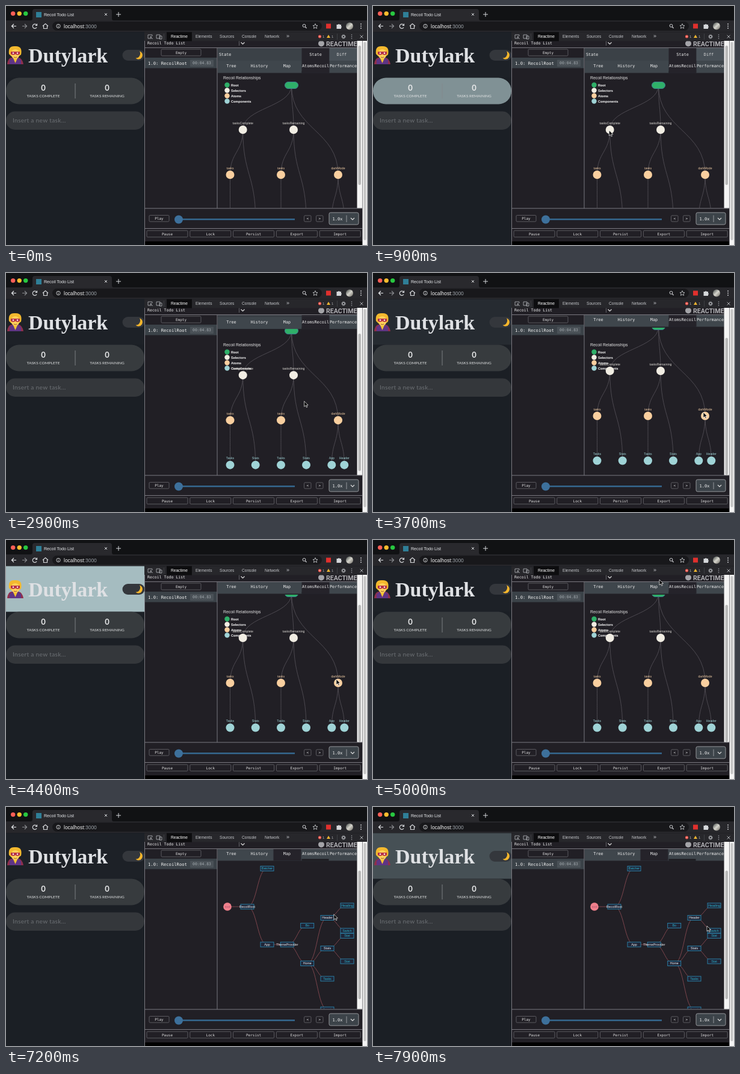
Animation of 600 by 398 pixels, one loop 8 s. Source, as an HTML page:

```html
<!DOCTYPE html>
<html lang="en">
<head>
<meta charset="utf-8">
<title>Recoil Todo List</title>
<style>
html, body { margin: 0; width: 100%; height: 100%; overflow: hidden; background: #111214; }
svg { display: block; width: 600px; height: 398px; font-family: "Liberation Sans", Arial, sans-serif; }
.mono { font-family: "DejaVu Sans Mono", monospace; }
.lato { font-family: Lato, sans-serif; }
.serif { font-family: "Liberation Serif", serif; font-weight: 700; }
.bold { font-weight: 700; }
.logo { font-family: Roboto, sans-serif; font-weight: 700; }
</style>
</head>
<body>
<svg id="stage" viewBox="0 0 600 398"></svg>
<script>
const stage = document.getElementById('stage');
const rect = (x, y, w, h, fill, more = '') =>
  `<rect x="${x}" y="${y}" width="${w}" height="${h}" fill="${fill}" ${more}/>`;
const disc = (x, y, r, fill, more = '') =>
  `<circle cx="${x}" cy="${y}" r="${r}" fill="${fill}" ${more}/>`;
const line = (d, color, w = 1) =>
  `<path d="${d}" fill="none" stroke="${color}" stroke-width="${w}"/>`;
const text = (x, y, s, size, fill, cls = '', anchor = 'start') =>
  `<text x="${x}" y="${y}" font-size="${size}" fill="${fill}" class="${cls}" text-anchor="${anchor}">${s}</text>`;
const mid = (x, y, s, size, fill, cls) => text(x, y, s, size, fill, cls, 'middle');
const button = (x, y, w, h, s) =>
  rect(x, y, w, h, '#211f25', 'rx="1.5" stroke="#6b6a70" stroke-width=".8"') +
  mid(x + w / 2, y + h / 2 + 2.2, s, 6, '#e4e4e4', 'mono');

function browser() {
  const ink = '#d5d7da';
  return rect(0, 0, 600, 24, '#111214') +
    ['#ff5f57', '#febc2e', '#28c840'].map((c, i) => disc(11.7 + 10.5 * i, 12.6, 3.7, c)).join('') +
    '<path d="M41 24Q44 24 44 21V9Q44 5 48 5H172Q176 5 176 9V21Q176 24 179 24Z" fill="#29292d"/>' +
    rect(50, 10, 9, 9, '#2f7f97') +
    text(63, 16.5, 'Recoil Todo List', 7.1, '#e8eaed') +
    line('M164 12L168 16M168 12L164 16M187 10V18M183 14H191', ink) +
    rect(0, 24, 600, 19.5, '#27272b') +
    rect(77, 26, 448, 15, '#18181b', 'rx="7.5"') +
    line('M17 33.5H9.5M13 30L9.5 33.5L13 37', '#e8eaed', 1.2) +
    line('M27 33.5H34.5M31 30L34.5 33.5L31 37', '#8b8d91', 1.2) +
    line('M51 32A3.6 3.6 0 1 0 51 35.5M51.5 29.5V32.5H48.5', ink, 1.2) +
    line('M61 33.5L65.5 29.5L70 33.5M62.5 33V37.5H68.5V33', ink, 1.2) +
    disc(87, 33.5, 3.2, 'none', `stroke="${ink}" stroke-width=".9"`) + line('M87 33V35.5M87 31.3V32.2', ink, .9) +
    '<text x="96" y="36.5" font-size="8.5" fill="#f1f1f1">localhost<tspan fill="#9aa0a6">:3000</tspan></text>' +
    disc(495.5, 32.8, 2.4, 'none', `stroke="${ink}"`) + line('M497.3 34.6L499.5 37', ink, 1.2) +
    '<path d="M514 29.5L515.2 32.3L518 32.5L515.9 34.5L516.6 37.4L514 35.8L511.4 37.4L512.1 34.5L510 32.5L512.8 32.3Z" fill="none" stroke="#d5d7da" stroke-width=".8"/>' +
    rect(532, 29.5, 8, 8, '#e0302d') +
    '<path d="M549.5 31H552A1.3 1.3 0 0 1 554.5 31H557V33.5A1.3 1.3 0 0 1 557 36V38H549.5Z" fill="#d5d7da"/>' +
    disc(571, 33.5, 6, 'url(#photo)') +
    [30, 33.5, 37].map(y => disc(590, y, .9, ink)).join('');
}

function page() {
  return rect(0, 43.5, 230, 355, '#1b1f25') +
    '<rect id="header" y="43.5" width="230" height="76"/>' +
    // caped figure
    '<path d="M2 97Q3 87 9 86H21Q27 87 29 97Z" fill="#8f2f4c"/>' +
    '<path d="M6 97V90L11 86H20L25 90V97Z" fill="#5f3585"/>' +
    '<path d="M12 87H19L15.5 95Z" fill="#f5c531"/>' +
    '<path d="M5 80Q3 66 15 67Q28 66 25 81L21 84H9Z" fill="#f4b92e"/>' +
    '<ellipse cx="15.5" cy="80" rx="7" ry="8" fill="#ffd05a"/>' +
    '<path d="M8 76H23V80Q19 83 15.5 80Q12 83 8 80Z" fill="#b52f45"/>' +
    disc(12, 78.5, 1.2, '#fff') + disc(19, 78.5, 1.2, '#fff') +
    line('M13 85Q15.5 87 18 85', '#8d4a25', .9) +
    text(37, 93.5, 'Dutylark', 34, '#dfe1e4', 'serif') +
    rect(193.5, 73, 37, 18, '#34373c', 'rx="9"') +
    '<path d="M222 75.3A6.8 6.8 0 1 1 215.5 86.8A7.6 7.6 0 0 0 222 75.3Z" fill="#f6b72c"/>' +
    '<rect id="stats" y="119.5" width="230" height="44" rx="21.5"/>' +
    line('M115 129V154', '#85898c', .9) +
    mid(62, 140.7, '0', 13, '#e9eaeb', 'lato bold') + mid(168, 140.7, '0', 13, '#e9eaeb', 'lato bold') +
    mid(62, 152.2, 'TASKS COMPLETE', 6.5, '#e2e4e5', 'lato') +
    mid(168, 152.2, 'TASKS REMAINING', 6.5, '#e2e4e5', 'lato') +
    rect(0, 175.5, 230, 30.5, '#34373b', 'rx="15"') +
    '<text x="11" y="194" font-size="10.2" letter-spacing=".3" fill="#6c7074" class="lato">Insert a new task...</text>';
}

function tools() {
  const tabs = [[274, 'Reactime'], [315, 'Elements'], [355, 'Sources'], [392, 'Console'], [430, 'Network'], [466, '»']];
  const ink = '#a9abaf';
  const panel = rect(230, 43.5, 370, 355, '#211f25') +
    text(235, 64, 'Recoil Todo List', 6.55, '#ededed', 'mono') +
    line('M387.5 58V66', '#77777c', .8) + line('M390.5 60.5L393.5 63.5L396.5 60.5', '#ddd', 1.2) +
    disc(524, 62.5, 5, '#a4a4a8') + text(532, 67, 'REACTIME', 10.6, '#b0b0b4', 'logo') +
    button(258, 72, 66, 11, 'Empty') +
    rect(231, 86, 120, 17.5, '#3b4248') +
    text(236, 97.5, '1.0: RecoilRoot', 7.2, '#f0f0f0', 'mono') +
    rect(306, 89.5, 39, 11.5, '#4a5157', 'rx="1"') + mid(325.5, 97.3, '00:04.83', 6.4, '#a5abb0', 'mono');
  // the bar cuts off the top of the scrolled panel
  return panel + rect(230, 43.5, 370, 15, '#27272b') + rect(267, 43.5, 42, 15, '#0d0d0f') +
    line('M242 54H236V48H243V50M240 51L244 55M240 53.5V51H242.5M250 48H256V54H250ZM255 50H259V55H255Z', ink, .9) +
    line('M262.5 46V56', '#4a4c50', .7) +
    tabs.map(([x, s], i) => text(x, 53, s, i < 5 ? 6.6 : 9, i ? '#c4c6ca' : '#fff')).join('') +
    disc(521.5, 50.8, 2.6, '#ee5147') + line('M520.5 49.8L522.5 51.8M522.5 49.8L520.5 51.8', '#fff', .6) +
    text(526, 53, '1', 6, ink) +
    '<path d="M536 47.8L539 53H533Z" fill="#f2b632"/>' + text(541, 53, '1', 6, ink) +
    line('M550.5 46V56', '#4a4c50', .7) +
    disc(561, 51, 2.5, 'none', `stroke="${ink}" stroke-width="2" stroke-dasharray="1.3 .65"`) +
    disc(561, 51, 1.9, 'none', `stroke="${ink}" stroke-width=".9"`) +
    [48, 51, 54].map(y => disc(574.5, y, .8, ink)).join('') +
    line('M588.5 48.5L593.5 53.5M593.5 48.5L588.5 53.5', ink);
}

function tabRows() {
  const names = ['Tree', 'History', 'Map', 'AtomsRecoil', 'Performance'];
  return rect(352, 70, 231.5, 21, '#3b4147') + rect(491.5, 70, 46, 21, '#25232a') + rect(537.5, 70, 46, 21, '#495158') +
    text(354, 83, 'State', 6.8, '#eee', 'mono') + mid(514.5, 83, 'State', 6.8, '#eee', 'mono') +
    mid(558, 83, 'Diff', 6.8, '#ddd', 'mono') +
    rect(352, 91, 231.5, 20.5, '#3f464c') + rect(491.5, 108.5, 45, 3, '#1d1c21') +
    '<rect id="active" y="91" width="46" height="20.5" fill="#25232a"/>' +
    names.map((s, i) => mid([374.5, 421, 467, 514.5, 560.5][i], 102, s, 6.8, '#eee', 'mono')).join('');
}

const shades = ['#2fb069', '#f1ede3', '#f9cf9f', '#9fd3d6'];

function legend() {
  return text(361, 122, 'Recoil Relationships', 6.9, '#e6e6e6') +
    ['Root', 'Selectors', 'Atoms', 'Components'].map((s, i) =>
      disc(367.5, 131.5 + 9 * i, 4.2, shades[i]) + text(374, 133.5 + 9 * i, s, 5.5, '#fff', 'bold')).join('');
}

function graph() {
  // name, x, level, y, parent
  const nodes = [['', 474.5, 0, 132],
    ['tasksComplete', 393.7, 1, 206, 0], ['tasksRemaining', 478, 1, 206, 0],
    ['tasks', 372.5, 2, 281, 1], ['tasks', 457, 2, 281, 2], ['darkMode', 552, 2, 281, 0],
    ['Tasks', 372.5, 3, 355.5, 3], ['Stats', 414.7, 3, 355.5, 1],
    ['Tasks', 457, 3, 355.5, 4], ['Stats', 499, 3, 355.5, 2],
    ['App', 541.3, 3, 355.5, 5], ['Header', 562.3, 3, 355.5, 5]];
  const links = nodes.slice(1).map(([, x, , y, p]) => {
    const [, px, , py] = nodes[p], m = (y + py) / 2;
    return line(`M${px} ${py}C${px} ${m} ${x} ${m} ${x} ${y}`, '#57545b', .8);
  });
  const marks = nodes.map(([s, x, k, y]) => k
    ? disc(x, y, 7, shades[k]) + mid(x, y - 9.3, s, 5.2, ['', '#dad7d2', '#e9c6a0', '#9fd3d6'][k])
    : rect(x - 11, y - 5.5, 22, 11, shades[0], 'rx="5.5" stroke="#3d8290"'));
  return links.join('') + marks.join('');
}

function tree() {
  // name, x, y, parent
  const nodes = [['root', 368, 166], ['RecoilRoot', 401, 166, 0], ['Batcher', 434, 102.5, 1], ['App', 434, 229, 1],
    ['ThemeProvider', 467.3, 229, 3], ['Bo', 500.7, 197.5, 4], ['Home', 500.7, 260.5, 4],
    ['Header', 534, 184.5, 6], ['Stats', 534, 235.5, 6], ['Tasks', 534, 286, 6], ['Input', 534, 337, 6],
    ['Heading', 567, 164, 7], ['Switch', 567, 206, 7], ['Stat', 567, 214.5, 8], ['Stat', 567, 257, 8]];
  const links = nodes.slice(1).map(([, x, y, p]) => {
    const [, px, py] = nodes[p], m = (x + px) / 2;
    return line(`M${px} ${py}C${m} ${py} ${m} ${y} ${x} ${y}`, '#a2555d', .7);
  });
  const marks = nodes.map(([s, x, y], i) => {
    if (!i) return disc(x, y, 6.8, '#f0808c') + mid(x, y + 1.7, s, 5, '#a8506c');
    const inner = nodes.some(n => n[3] === i);
    return rect(x - 11, y - 4, 22, 8, '#1f2638', 'stroke="#2b87b0" stroke-width=".9"') +
      mid(x, y + 1.8, s, 5.3, inner ? '#f2f4f6' : '#2cb3cd');
  });
  return links.join('') + marks.join('');
}

function player() {
  return line('M231 69.5H583.5M351 69V337M231 337H592M231 370.5H592M230.5 58V398', '#7b7a81', 1) +
    button(238, 348.5, 33, 10.5, 'Play') +
    line('M287 355.3H480', '#35688f', 2.4) + disc(287, 355.5, 7, '#3d709b') +
    button(495.5, 349, 11.5, 10, '&lt;') + button(515.5, 349, 11.5, 10, '&gt;') +
    rect(537, 344, 49, 20, '#3c4349', 'rx="2.5" stroke="#a2a4a8" stroke-width=".9"') +
    text(542.5, 356.5, '1.0x', 7, '#f0f0f0', 'mono') +
    line('M566 348.5V360', '#a2a4a8', .9) + line('M573 353L576 356L579 353', '#ddd', 1.2) +
    ['Pause', 'Lock', 'Persist', 'Export', 'Import'].map((s, i) => button(234 + 71.8 * i, 374, 68, 10.8, s)).join('') +
    rect(231, 392, 361, 6, '#000') +
    rect(583.5, 58, 8.5, 278.5, '#f4f4f4') +
    '<rect id="thumb" x="585.5" width="4.5" rx="2.2" fill="#b9b9b9"/>' +
    rect(592.5, 58, 7.5, 340, '#f4f4f4') + rect(594.5, 60, 4, 330, '#c4c4c4', 'rx="2"');
}

stage.innerHTML = `<defs>
  <linearGradient id="photo" x2="1" y2="1"><stop stop-color="#3b413f"/><stop offset=".5" stop-color="#d6d5cd"/><stop offset="1" stop-color="#6a675f"/></linearGradient>
  <clipPath id="rows"><rect x="352" y="69" width="232" height="267"/></clipPath>
  <clipPath id="view"><rect x="352" y="91" width="232" height="245"/></clipPath></defs>` +
  browser() + page() + tools() +
  `<g clip-path="url(#view)"><g id="atoms">${legend()}<g id="graph">${graph()}</g></g><g id="tree">${tree()}</g></g>` +
  `<g clip-path="url(#rows)"><g id="tabs">${tabRows()}</g></g>` + player() +
  '<path id="pointer" d="M0 0V9L2.2 7L3.7 10.3L5.2 9.6L3.7 6.5H6.5Z" fill="#000" stroke="#fff" stroke-width=".7"/>';

const el = id => document.getElementById(id);

// keys: [time, value, ...]; linear between, held outside
function at(t, keys, k = 1) {
  const i = keys.findIndex(key => key[0] > t);
  if (i === 0) return keys[0][k];
  if (i < 0) return keys[keys.length - 1][k];
  const a = keys[i - 1], b = keys[i];
  return a[k] + (b[k] - a[k]) * (t - a[0]) / (b[0] - a[0]);
}
const glow = [165, 188, 192];
const tint = (base, f) => `rgb(${base.map((v, i) => Math.round(v + (glow[i] - v) * f))})`;

const path = [[300, 440, 170], [700, 393, 207], [1000, 392, 207], [1700, 474, 206], [2400, 474, 206],
  [3000, 500, 215], [3200, 500, 215], [3700, 549, 232], [4400, 549, 232], [5000, 476, 66], [5400, 468, 78],
  [5600, 468, 78], [6200, 551, 143], [6700, 562, 160], [7400, 538, 186], [7900, 555, 198]];
const statsGlow = [[500, 0], [1100, 1], [2400, 1], [2900, 0]];
const headerGlow = [[3680, 0], [4000, 1], [4400, 1], [4900, 0], [7600, 0], [8000, .4]];
const scroll = [[2400, 0], [3000, 1]];

function draw(now) {
  const t = Math.floor(now % 8000 / 100) * 100;
  const s = at(t, scroll), map = t >= 5500;
  el('stats').setAttribute('fill', tint([55, 59, 62], at(t, statsGlow)));
  el('header').setAttribute('fill', tint([29, 33, 39], at(t, headerGlow)));
  el('tabs').setAttribute('transform', `translate(0 ${-22 * s})`);
  el('graph').setAttribute('transform', `translate(0 ${-43 * s})`);
  el('active').setAttribute('x', map ? 444.5 : 491.5);
  el('atoms').setAttribute('display', map ? 'none' : 'inline');
  el('tree').setAttribute('display', map ? 'inline' : 'none');
  el('thumb').setAttribute('y', map ? 106 : 66 + 42 * s);
  el('thumb').setAttribute('height', map ? 214 : 232 - 4 * s);
  el('pointer').setAttribute('display', t < 300 ? 'none' : 'inline');
  el('pointer').setAttribute('transform', `translate(${at(t, path)} ${at(t, path, 2)})`);
}
const start = performance.now();
function tick() {
  draw(performance.now() - start);
  requestAnimationFrame(tick);
}
tick();
</script>
</body>
</html>
```
